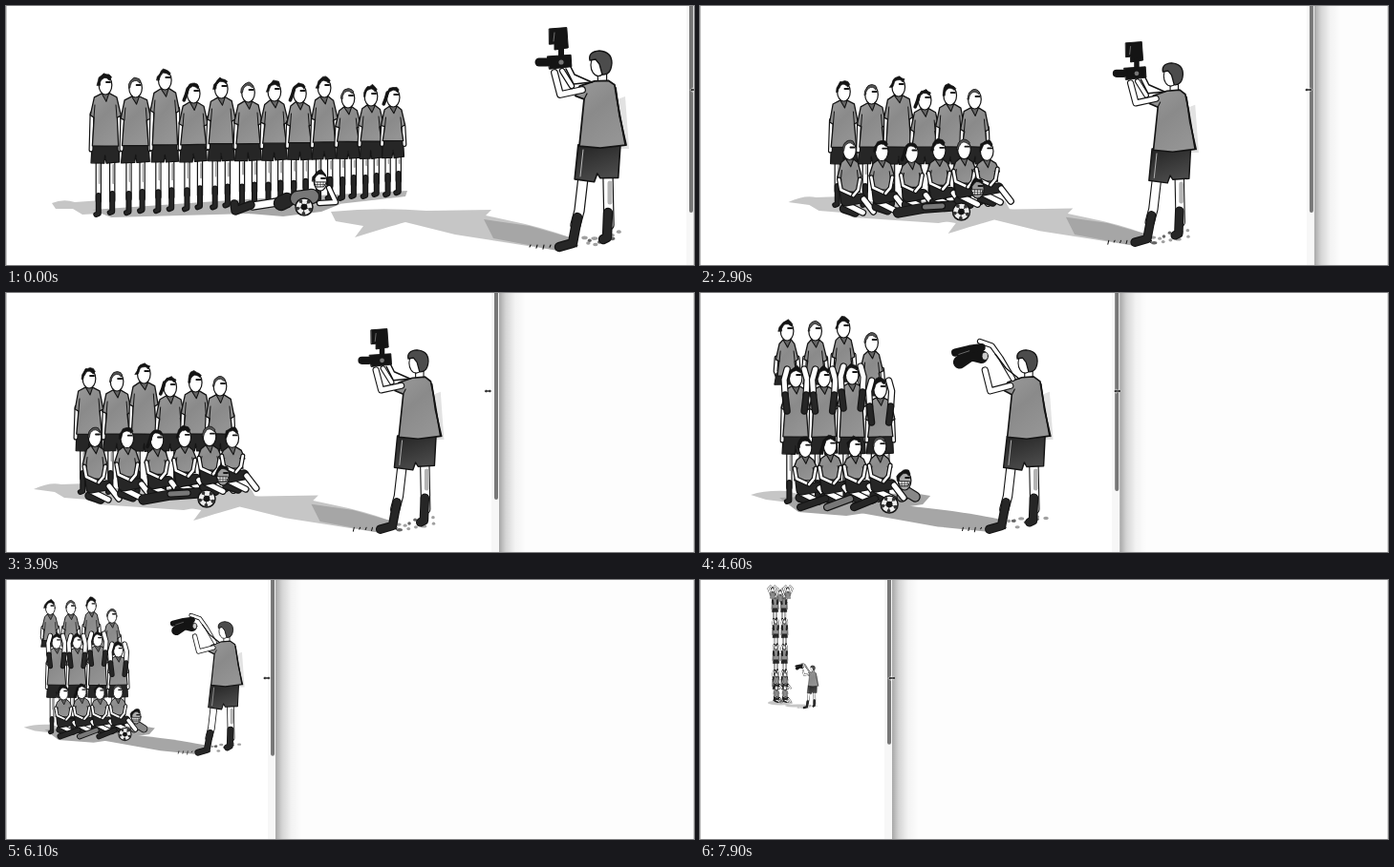
Animation of 720 by 272 pixels, one loop 8 s. Source, as an HTML page:

```html
<!DOCTYPE html>
<html lang="en">
<head>
<meta charset="utf-8">
<title>Team photo</title>
<style>
html, body { margin: 0; width: 100%; height: 100%; overflow: hidden; background: #fff; }
svg { display: block; width: 720px; height: 272px; }
</style>
</head>
<body>
<svg id="stage" viewBox="0 0 720 272" stroke-linejoin="round" stroke-linecap="round"></svg>
<script>
const INK = '#141414', CLOTH = '#262626', SHIRT = 'url(#wash)', SKIN = '#fff', PALE = '#c6c6c6', SHADE = '#a6a6a6';
const LOOP = 8000, STEP = 100;

let seed = 11;
const rnd = () => (seed = seed * 16807 % 2147483647) / 2147483647;
const jit = a => (rnd() - 0.5) * a;
const times = (n, f) => Array.from({ length: n }, (_, i) => f(i)).join('');
const both = f => f(-1) + f(1);

// drawing helpers
const trace = p => 'M' + p.map(v => v.toFixed(1)).join(' ');
const stroke = (color, w, d) => `<path d="${d}" fill="none" stroke="${color}" stroke-width="${w}"/>`;
const line = (w, ...p) => stroke(INK, w, trace(p));
const limb = (fill, w, ...p) => stroke(INK, w + 2.4, trace(p)) + stroke(fill, w, trace(p));
const poly = (fill, w, ...p) =>
  `<path d="${trace(p.map(v => v + jit(0.8)))}Z" fill="${fill}" stroke="${INK}" stroke-width="${w}"/>`;
const wash = (fill, d) => `<path d="${d}" fill="${fill}"/>`;
const oval = (x, y, rx, ry, fill, w = 0) =>
  `<ellipse cx="${x}" cy="${y}" rx="${rx}" ry="${ry}" fill="${fill}" stroke="${INK}" stroke-width="${w}"/>`;
const place = (x, y, k, ...parts) => `<g transform="translate(${x} ${y}) scale(${k})">${parts.join('')}</g>`;

// ragged strip of hair around the crown; style 2 hangs down at the back
function hair(x, y, style) {
  const outer = [], inner = [];
  for (let i = 0; i < 8; i++) {
    const a = Math.PI * (1 + i * 0.11);
    const r = 1.02 + rnd() * [0.26, 0.08, 0.16][style];
    outer.push(x + 7 * r * Math.cos(a), y + 10 * r * Math.sin(a));
    inner.unshift(x + 5.8 * Math.cos(a), y + 7.6 * Math.sin(a));
  }
  return poly(style === 1 ? '#555' : INK, 0.7, ...outer, ...inner) +
    (style === 2 ? line(3.5, x - 6, y - 5, x - 8, y + 2, x - 10, y + 7) : '');
}

const head = (x, y, style, skin = SKIN) => oval(x, y, 6.8, 10, skin, 1.2) + hair(x, y, style) +
  line(1.8, x + 1, y - 3, x + 5, y - 3);

function shirt(x, top, end, w) {
  const cuff = top + Math.min(23, (end - top) * 0.55);
  const side = s => [x + s * 4, top, x + s * (w - 3), top + 4, x + s * (w + 1), cuff, x + s * (w - 3), cuff + 2, x + s * (w - 1), end];
  const left = side(-1), right = side(1), back = [];
  while (right.length) back.push(...right.splice(-2));
  return poly(SHIRT, 1.3, ...left, ...back) +
    both(s => line(1, x + s * (w - 4), top + 12, x + s * (w - 3), cuff + 2)) +
    poly('#666', 1.1, x - 4, top, x + 1, top + 8, x + 4, top);
}

const shorts = (x, y, w) => poly(CLOTH, 1.2, x - w + 1, y, x - w, y + 19, x - 1, y + 19, x, y + 11, x + 1, y + 19, x + w, y + 18, x + w - 1, y);
const boot = (x, y, h) => limb(CLOTH, 3.6, x, y - h, x, y - 1, x - 2.5, y);

function stand(x, hy, waist, foot, w, style) {
  return both(s => {
    const lx = x + s * w * 0.48;
    return limb(SKIN, 4, lx, waist + 14, lx, foot - 14) + stroke('#aaa', 2, trace([lx + 1, waist + 20, lx + 1, foot - 32])) + boot(lx, foot - s, 20);
  }) + shorts(x, waist - 1, w) +
    both(s => limb(SKIN, 2.6, x + s * (w - 1), hy + 30, x + s * w, waist + 4)) +
    shirt(x, hy + 9, waist, w) + head(x, hy, style);
}

function kneel(x, hy, base, style) {
  return limb(CLOTH, 7, x - 6, base - 7, x + 6, base - 3) + limb(SKIN, 5, x - 4, base - 12, x + 14, base - 3) +
    limb(CLOTH, 9, x - 5, base - 24, x - 4, base - 15, x + 12, base - 18) + limb(SKIN, 5, x + 15, base - 17, x + 25, base - 4) +
    shirt(x, hy + 9, base - 25, 12) +
    both(s => limb(SKIN, 2.6, x + s * 11, base - 38, x + s * 9, base - 27, x + 4, base - 21)) + head(x, hy, style);
}

// legs hanging over someone's shoulders
const dangle = (x, y) => both(s => limb(SKIN, 5, x + s * 9, y - 13, x + s * 12, y - 2, x + s * 11, y + 14) +
  limb(CLOTH, 5, x + s * 11, y + 14, x + s * 9, y + 31));

const perch = (x, hy, style) => both(s => limb(SKIN, 2.6, x + s * 11, hy + 28, x + s * 12, hy + 42, x + s * 9, hy + 50)) +
  poly(CLOTH, 1, x - 11, hy + 44, x - 13, hy + 56, x + 13, hy + 56, x + 11, hy + 44) +
  shirt(x, hy + 9, hy + 47, 11) + head(x, hy, style);

const ball = (x, y) => oval(x, y, 9, 9, '#eee', 1.5) + oval(x, y, 3.4, 3.2, INK) +
  times(5, i => {
    const c = Math.cos(i * 1.257 + 0.4), s = Math.sin(i * 1.257 + 0.4);
    return line(0.8, x, y, x + 7 * c, y + 7 * s) + oval(x + 7 * c, y + 7 * s, 1.9, 1.9, '#333');
  });

const grin = (x, y, skin) => head(x, y, 0, skin) + poly(SKIN, 0.9, x - 6, y + 1, x + 6, y + 1, x + 4, y + 6, x - 4, y + 6) +
  line(0.6, x - 5, y + 3.5, x + 5, y + 3.5) + times(3, i => line(0.6, x - 3 + i * 3, y + 1, x - 3 + i * 3, y + 6));

// photographer
const strap = (...p) => line(1.6, ...p, 613, 80);
const cameraLevel = strap(588, 58, 595, 72) + strap(586, 66, 594, 82) + limb(SKIN, 5.5, 603, 88, 580, 93, 574, 70) +
  limb(SKIN, 4, 592, 84, 582, 68) +
  poly(INK, 1, 569, 24, 587, 23, 588, 44, 574, 46, 574, 40, 569, 40) + line(6, 581, 44, 581, 52) +
  poly(INK, 1, 567, 53, 591, 51, 592, 64, 569, 66) + line(9, 558, 59, 566, 59) +
  line(0.8, 574, 28, 573, 37).replace(INK, '#888') + oval(581, 59, 2.6, 2.6, '#777');

const cameraUp = limb(SKIN, 4, 606, 80, 592, 56, 582, 42, 568, 37) + strap(586, 52, 598, 68) +
  limb(SKIN, 5.5, 603, 88, 580, 94, 574, 70) +
  line(15, 545, 61, 558, 52, 570, 55) + line(9, 540, 50, 556, 46, 570, 44) + oval(574, 54, 3.5, 4.5, '#ccc', 1) +
  line(0.8, 544, 52, 556, 48).replace(INK, '#888');

function photographer(arms, shade) {
  return shade + times(12, i => oval(598 + i * 4 + jit(8), 250 - i * 0.7 + jit(12), 1.5 + rnd() * 2, 1.8, i % 3 ? '#a0a0a0' : '#666')) +
    times(8, i => line(1.1, 548 + i * 7, 254 + jit(4), 549 + i * 7, 251)) +
    wash('#e2e2e2', 'M640 98L648 95 652 150 642 150Z') +
    limb(SKIN, 9, 604, 180, 600, 215, 596, 230) + limb(SKIN, 9, 630, 180, 631, 230) +
    stroke('#b4b4b4', 5, trace([632, 186, 632, 206])) +
    limb(CLOTH, 8, 598, 222, 593, 249, 579, 253) + limb(CLOTH, 8, 630, 217, 629, 243, 625, 245) +
    poly('url(#dark)', 1.6, 599, 146, 595, 182, 616, 185, 619, 176, 622, 181, 641, 180, 643, 144) +
    stroke('#bbb', 1, 'M604 151L601 179') + limb(SKIN, 8, 624, 70, 624, 80) +
    poly(SHIRT, 1.8, 616, 79, 600, 84, 596, 94, 605, 98, 600, 147, 622, 149, 648, 146, 640, 100, 637, 83, 630, 78) +
    line(1.8, 638, 86, 642, 115, 649, 146) + line(1.2, 605, 98, 608, 92) +
    oval(620, 62, 8, 11.5, SKIN, 1.2) +
    `<path d="M611 57Q609 48 621 47 634 48 634 60 633 73 624 72L621 61 617 56Z" fill="#4c4c4c" stroke="${INK}" stroke-width="1.4"/>` + arms;
}

const longShade = wash(PALE, 'M340 216Q390 211 440 215L508 214 502 220 525 225Q560 232 590 243L578 257 470 240 418 227Q400 232 365 243L374 231 345 226Z') +
  wash(SHADE, 'M500 224L548 231 590 243 578 257 510 244Z');
const shortShade = wash(SHADE, 'M440 226L485 226Q560 234 597 243L580 256 520 250 430 234Z');

// four arrangements, from wide to narrow
const HEADS = [83, 86, 78, 92, 87, 91, 90, 92, 86, 97, 95, 96];
const TOPS = [40, 40, 37, 52];
const style = i => i % 4 === 3 ? 2 : i % 4 % 2;

const wide = wash(PALE, 'M48 207Q60 202 72 206L100 204 98 218 80 219 70 213 52 213Z') +
  wash('#b4b4b4', 'M90 214L250 203 420 194 418 200 260 218 110 222Z') +
  times(12, i => stand(104 + 32 * i - 0.42 * i * i, HEADS[i], 147 - i * 0.5, 218 - i * 1.9, 15 - i * 0.3, style(i))) +
  wash(SHADE, 'M232 216L350 208 330 216 290 221Z') +
  limb(SKIN, 7, 284, 206, 258, 210) + limb(CLOTH, 7, 256, 209, 240, 215, 239, 208) +
  limb(CLOTH, 14, 288, 207, 294, 204) + limb('#777', 14, 305, 202, 320, 200) +
  limb(SKIN, 4, 328, 207, 345, 206, 338, 191) + grin(329, 184, SKIN) + ball(312, 211) +
  photographer(cameraLevel, longShade);

const twoRows = wash(PALE, 'M93 206Q110 198 122 201L150 200 150 217 125 215 115 209Z') +
  wash(PALE, 'M140 205H320L325 214 250 228 160 222Z') +
  place(-73.5, 16.9, 0.914, photographer(cameraLevel, longShade)) +
  times(6, i => stand(151 + 29.5 * i - 0.42 * i * i, HEADS[i] + 7, 148, 208, 14, style(i))) +
  times(6, i => kneel(157 + 35 * i - 1.25 * i * i, 153 + jit(5), 220 - i * 2.2, style(i + 1))) +
  limb(CLOTH, 9, 208, 217, 236, 212, 264, 210) + limb('#777', 5, 236, 211, 254, 210) +
  grin(291, 192, '#999') + ball(274, 216);

const column = i => 29.5 * i;
const threeRows = wash(PALE, 'M20 212Q35 207 58 208L80 214 60 220 36 217Z') +
  wash(SHADE, 'M50 215L190 210 208 213 200 222 120 234 70 230Z') +
  place(-259.5, 16.9, 0.914, photographer(cameraUp, shortShade)) +
  times(4, i => perch(58 + column(i), TOPS[i], i % 2)) +
  times(4, i => stand(67 + column(i), TOPS[i] + 49, 151, 218, 14, 0) + dangle(67 + column(i), TOPS[i] + 53)) +
  limb('#888', 9, 178, 214, 184, 209, 192, 214) + grin(181, 197, '#aaa') +
  times(4, i => kneel(77 + 26 * i, 162 + jit(5), 222 - i, style(i + 2))) +
  times(3, i => limb(i === 1 ? '#777' : CLOTH, 6, 72 + i * 28, 225, 98 + i * 26, 216)) + ball(165, 222);

const K = 0.235;
const tower = oval(84, 129, 13, 2.4, PALE) + oval(103, 132, 14, 1.6, PALE) +
  times(8, i => place(79 + i % 2 * 9.3 + jit(1.2), 45 + (i >> 1) * 27, K,
    stand(0, -122, -66, 0, 14, style(i)), dangle(0, -116))) +
  times(3, i => place(76 + i * 8, 10 + i % 2 * 3, K,
    both(s => limb(SKIN, 5, s * 12, 16, s * 20, -4, s * 10, -16)), shirt(0, 9, 40, 12), head(0, 0, 0))) +
  times(4, i => place(80 + i % 2 * 9, 99 + (i >> 1) * 14, K, kneel(0, 0, 66, i % 2))) +
  place(85, 127, K, ball(0, 0)) +
  place(-15.7, 79.7, 0.215, photographer(cameraUp, ''));

document.getElementById('stage').innerHTML = `
<defs>
  <linearGradient id="wash" x2=".6" y2="1"><stop stop-color="#9a9a9a"/><stop offset=".5" stop-color="#8a8a8a"/><stop offset="1" stop-color="#949494"/></linearGradient>
  <linearGradient id="dark" x2=".4" y2="1"><stop stop-color="#222"/><stop offset="1" stop-color="#4a4a4a"/></linearGradient>
  <linearGradient id="drop"><stop stop-opacity=".34"/><stop offset=".25" stop-opacity=".16"/><stop offset=".6" stop-opacity=".04"/><stop offset="1" stop-opacity="0"/></linearGradient>
</defs>
<rect width="720" height="272" fill="#fff"/>
${[wide, twoRows, threeRows, tower].map(s => `<g class="art">${s}</g>`).join('')}
<g id="edge">
  <rect x="-8" width="8" height="272" fill="#f7f7f7"/>
  <rect width="722" height="272" fill="#fdfdfd"/>
  <rect width="28" height="272" fill="url(#drop)"/>
  <rect id="thumb" x="-5" y="-4" width="4" rx="2" fill="#777"/>
</g>
<rect width="1" height="272" fill="#c6c6c6"/>
<rect x="719" width="1" height="272" fill="#d8d8d8"/>
<path id="cursor" d="M-4 0L-1.5-2V-1H1.5V-2L4 0 1.5 2V1H-1.5V2Z" fill="#222" stroke="#fff" stroke-width=".5"/>`;

// window width at the turning points of the drag, joined by a smooth monotone curve
const DRAG = [[0, 720], [1400, 720], [1900, 697], [2200, 645], [2800, 645], [3900, 516], [4700, 437], [5000, 437],
  [5600, 373], [5900, 303], [6700, 243], [7000, 237], [7500, 201], [LOOP, 201]];
const slope = i => DRAG[i + 1] ? (DRAG[i + 1][1] - DRAG[i][1]) / (DRAG[i + 1][0] - DRAG[i][0]) : 0;
const tangent = i => {
  const a = i ? slope(i - 1) : 0, b = slope(i);
  return a && b ? 2 * a * b / (a + b) : 0;
};

function widthAt(t) {
  const i = Math.max(0, DRAG.findIndex(k => k[0] >= t) - 1);
  const [t0, a] = DRAG[i], [t1, b] = DRAG[i + 1];
  const h = t1 - t0, u = (t - t0) / h, v = 1 - u;
  return a + (b - a) * u * u * (3 - 2 * u) + h * u * v * (v * tangent(i) - u * tangent(i + 1));
}

const arts = [...document.querySelectorAll('.art')];
const [edge, thumb, cursor] = ['edge', 'thumb', 'cursor'].map(id => document.getElementById(id));

function draw(time) {
  const t = Math.floor(time % LOOP / STEP) * STEP;
  const w = widthAt(t);
  const moving = t > 0 && w !== widthAt(t - STEP);
  const x = moving ? widthAt(Math.min(t + STEP, LOOP)) : w;   // the pointer runs one step ahead
  const y = 88 + 15 * Math.min(1, Math.max(0, (t - 2900) / 1000));
  const k = Math.min(1, (w - 36) / 337);
  const shown = w > 700 ? 0 : w > 485 ? 1 : w > 220 ? 2 : 3;
  const shift = [(w - 720) / 2, (w - 644) / 2, k < 1 ? 14.8 * (1 - k) : (w - 373) / 2, (w - 201) / 2][shown];
  arts.forEach((g, i) => g.setAttribute('display', i === shown ? 'inline' : 'none'));
  arts[shown].setAttribute('transform', `translate(${shift} 0) scale(${shown === 2 ? k : 1})`);
  edge.setAttribute('transform', `translate(${w} 0)`);
  thumb.setAttribute('height', Math.min(221, 147 + 0.148 * w));
  cursor.setAttribute('transform', `translate(${x} ${y})`);
}

const start = performance.now();
function tick() {
  draw(performance.now() - start);
  requestAnimationFrame(tick);
}
tick();
</script>
</body>
</html>
```
